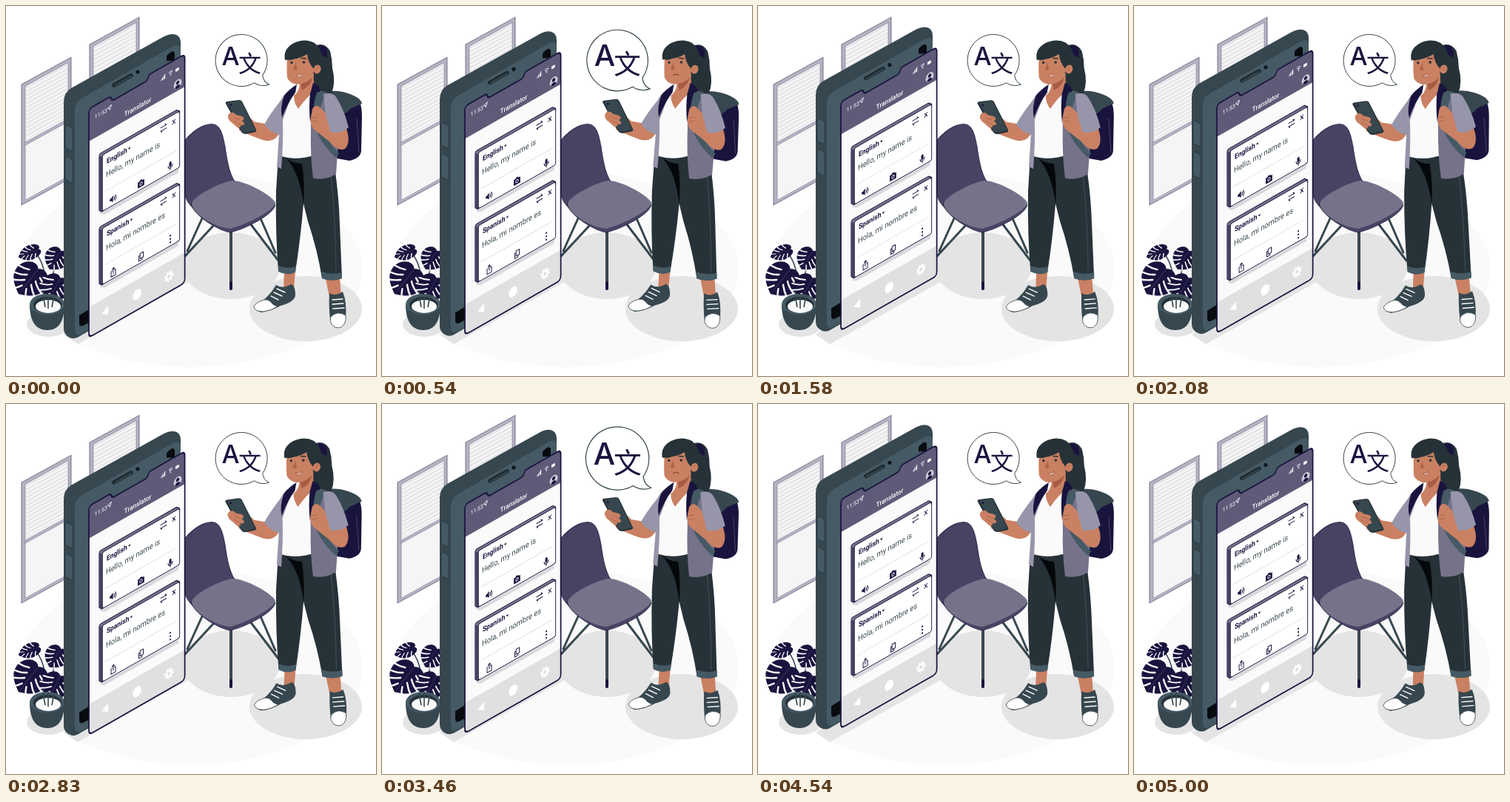
These frames come from a looping animation (500 px wide and 500 px high, 5.04 s). An HTML page:

```html
<!DOCTYPE html>
<html lang="en">
<head>
<meta charset="utf-8">
<title>Translator</title>
<style>
  html, body { margin: 0; height: 100%; overflow: hidden; background: #fff; }
  svg { display: block; width: 100vw; height: 100vh; font-family: Roboto, "Open Sans", sans-serif; }
  .navy { fill: #19143e; }
  .plum { fill: #474362; }
  .mauve { fill: #75728a; }
  .lilac { fill: #9795aa; }
  .skin { fill: #ca8062; }
  .ink { fill: #263238; }
  .slate { fill: #37474f; }
  .steel { fill: #455a64; }
  .paper { fill: #fafafa; }
  .shade { fill: #e4e4e4; }
  .white { fill: #fff; }
  .line { fill: none; stroke: #19143e; stroke-width: 1.1; stroke-linecap: round; stroke-linejoin: round; }
  .lace { fill: none; stroke: #fff; stroke-width: 1.4; stroke-linecap: round; }
  .leg { fill: none; stroke: #37474f; stroke-width: 3; stroke-linecap: round; }
  .fold { fill: none; stroke: #a85c43; stroke-width: .7; }
  .lang { font-size: 9.7px; font-weight: 700; fill: #19143e; }
  .say { font-size: 10.7px; fill: #37474f; }
</style>
</head>
<body>
<svg viewBox="0 0 500 500">
  <defs>
    <g id="window">
      <path d="M0 0H67V163H0Z" fill="#b5b2c2" stroke="#75728a"/>
      <path d="M5 5H63V159H5Z" fill="#f5f5f5" stroke="#8a87a0" stroke-width=".8"/>
      <path d="M34 7V78" stroke="#dcdce0" stroke-width="57" stroke-dasharray="1.4 4"/>
      <path d="M4 81H64V85H4Z" fill="#b5b2c2" stroke="#8a87a0" stroke-width=".6"/>
    </g>
    <g id="leaf">
      <path class="navy" d="M0-19C10-29 27-16 26 0C25 15 12 22 0 28C-12 22-25 15-26 0C-27-16-10-29 0-19Z"/>
      <path d="M-28-5Q-18-6-10-10M-28 7Q-16 5-8-2M-23 18Q-13 13-6 6M28-5Q18-6 10-10M28 7Q16 5 8-2M23 18Q13 13 6 6M-12 27Q-7 21-4 15M12 27Q7 21 4 15" fill="none" stroke="#fafafa" stroke-width="2.6" stroke-linecap="round"/>
      <path d="M0-18V24" stroke="#474362" stroke-width=".8"/>
    </g>
    <g id="card">
      <path d="M14 210L18 290L24 294H139V289H20Z" fill="#d8d8dd"/>
      <path d="M16 211Q16 208 19 208H136L141 212V216H22V288H20L16 284Z" class="mauve" stroke="#19143e"/>
      <path d="M16 211L21 214V288L16 284Z" class="plum"/>
      <rect x="21" y="212" width="120" height="76" rx="3" fill="#fff" stroke="#19143e"/>
      <path d="M25 263H137" stroke="#dcdce2" stroke-width=".9"/>
      <path class="line" d="M111.500 220H120.500L118.500 218M120.500 224.500H111.500L113.500 226.500M130 219.500L134 224.500M134 219.500L130 224.500"/>
    </g>
  </defs>

  <ellipse class="paper" cx="250" cy="356" rx="232" ry="132"/>
  <ellipse class="shade" cx="304" cy="351" rx="66" ry="45"/>
  <ellipse class="shade" cx="405" cy="409" rx="76" ry="44"/>
  <ellipse class="shade" cx="57" cy="430" rx="29" ry="17"/>
  <path class="shade" d="M78 444L97 457L275 357L250 340L112 420Z"/>
  <use href="#window" transform="matrix(1 -.55 0 1 21 106)"/>
  <use href="#window" transform="matrix(1 -.55 0 1 113 52)"/>

  <!-- chair -->
  <g>
    <path class="leg" d="M265 287L245 331M281 296L242 338M330 294L368 344M344 287L364 333"/>
    <path class="leg" d="M304 302V381" style="stroke-width:4"/>
    <path d="M304 374V382" stroke="#19143e" stroke-width="4" stroke-linecap="round"/>
    <path class="plum" d="M236 190C244 174 264 158 281 160C290 162 293 174 296 190C299 211 302 226 309 237L253 274Q243 265 240 252Z"/>
    <path class="plum" d="M250 267C252 282 287 304 303 306C320 303 363 282 364 268L357 270L303 298L259 275Z" stroke="#19143e" stroke-width=".6"/>
    <path class="mauve" d="M251 267C254 256 290 238 306 236C323 236 359 255 364 266C363 277 320 297 303 301C285 300 252 282 251 267Z"/>
    <path d="M246 178C257 164 272 158 281 160C290 162 293 174 296 190C299 211 302 226 309 237" fill="none" stroke="#19143e" stroke-width=".8"/>
  </g>

  <!-- plant -->
  <g>
    <path d="M57 405C54 391 47 383 41 377M55 404C57 374 51 346 41 335M59 404C63 386 68 383 72 376M58 403C62 372 63 358 68 348" fill="none" stroke="#37474f" stroke-width="1.6"/>
    <use href="#leaf" transform="translate(33 333) rotate(68) scale(.38 .62)"/>
    <use href="#leaf" transform="translate(68 341) rotate(32) scale(.62)"/>
    <use href="#leaf" transform="translate(33 369) rotate(38) scale(.92)"/>
    <use href="#leaf" transform="translate(67 380) rotate(28) scale(.74)"/>
    <path class="slate" d="M32 403C32 423 38 438 56 438C73 438 79 423 79 403Z"/>
    <ellipse class="steel" cx="55.500" cy="403" rx="23.500" ry="14"/>
    <ellipse class="ink" cx="56" cy="404" rx="19" ry="11"/>
    <ellipse class="paper" cx="57" cy="406" rx="17" ry="9"/>
    <path d="M53 407L50 391M57 409L57 390M62 407L65 391" stroke="#37474f" stroke-width="1.6"/>
  </g>

  <g id="phone">
    <path class="slate" d="M78 130Q78 117 88 111L212 42Q225 35 232 40Q236 43 236 50V366L100 446Q92 452 84 447Q78 443 78 436Z"/>
    <path class="steel" d="M93 142Q93 130 102 125L224 55Q236 48 236 60V366L104 442Q93 449 93 436Z"/>
    <path d="M99 418L112 410V428L104 432Q99 434 99 428ZM217 74V68Q218 65 225 61L228 63V74Z" fill="#080b10"/>
    <path class="steel" d="M80 165Q80 160 84 162L90 166V192Q90 197 86 195L80 191ZM80 207Q80 202 84 204L90 208V235Q90 240 86 238L80 234Z" stroke="#263238" stroke-width=".8"/>
    <path d="M146 107L169 94" stroke="#1d292f" stroke-width="5.500" stroke-linecap="round"/>
    <path d="M147 107.500L169 95" stroke="#37474f" stroke-width="2" stroke-linecap="round"/>
    <circle cx="178" cy="89" r="2.600" fill="#10171b"/>

    <g transform="matrix(.87 -.496 0 1 112 0)">
      <path id="panel" class="paper" d="M0 145Q0 139 6 139H30Q34 139 35 142.500T40 146H87Q91 146 92 142.500T97 139H143Q149 139 149 145V442Q149 448 143 448H6Q0 448 0 442Z"/>
      <path fill="#5e5a78" d="M0 183V145Q0 139 6 139H30Q34 139 35 142.500T40 146H87Q91 146 92 142.500T97 139H143Q149 139 149 145V183Z"/>
      <path fill="#e0e0e0" d="M0 407H149V442Q149 448 143 448H6Q0 448 0 442Z"/>
      <use href="#panel" style="fill-opacity:0" stroke="#19143e" stroke-width="2"/>

      <g fill="#fff">
        <text x="9" y="157.500" font-size="7.800">11:53</text>
        <text x="55" y="177" font-size="9.200" font-weight="500">Translator</text>
        <path d="M29 153L35 150.500L32.500 156.500L31.500 154Z" fill="none" stroke="#fff" stroke-width=".8"/>
        <path d="M112 157V155H113.200V157ZM113.800 157V153.500H115V157ZM115.600 157V152H116.800V157ZM117.400 157V150.500H118.600V157Z"/>
        <path d="M124 152.500Q127 150 130 152.500M125.200 154.500Q127 153 128.800 154.500" fill="none" stroke="#fff" stroke-width=".9"/>
        <circle cx="127" cy="156.200" r=".8"/>
        <rect x="134.500" y="152" width="5.500" height="4" rx="1"/>
        <circle cx="138" cy="174" r="6.300" fill="#c9c7d3"/>
        <circle class="navy" cx="138" cy="172" r="2.400"/>
        <path class="navy" d="M133.500 178Q138 172.500 142.500 178Q138 182 133.500 178Z"/>
      </g>

      <use href="#card"/>
      <text class="lang" x="27.500" y="227">English</text>
      <path class="navy" d="M61 222.500H65L63 225.200Z"/>
      <text class="say" x="26.500" y="245">Hello, my name is</text>
      <path class="navy" d="M32.500 277.300H34.500L37.500 274.500V283.500L34.500 280.700H32.500Z"/>
      <path class="line" d="M39 277Q40.500 279 39 281M40.800 275.300Q43.500 279 40.800 282.700"/>
      <path class="navy" d="M76 276.500H78.500L79.500 275H82.500L83.500 276.500H86V284.500H76Z"/>
      <circle cx="81" cy="280.300" r="1.900" fill="none" stroke="#fff"/>
      <rect class="navy" x="124.700" y="273" width="3.600" height="7" rx="1.800"/>
      <path class="line" d="M123 278Q123.500 281.500 126.500 281.500T130 278M126.500 282V284"/>

      <use href="#card" y="99"/>
      <text class="lang" x="27.500" y="325">Spanish</text>
      <path class="navy" d="M64 320.500H68L66 323.200Z"/>
      <text class="say" x="26.500" y="344">Hola, mi nombre es</text>
      <path class="line" d="M36 376.500H34.500V383.500H41.500V376.500H40M38 380V372.500M36 374.500L38 372.500L40 374.500"/>
      <path class="line" d="M79.500 374H84.500V381H79.500ZM79 376.500H77.500V383.500H82.500V381.500"/>
      <g class="navy"><circle cx="126.500" cy="373" r="1.200"/><circle cx="126.500" cy="377.500" r="1.200"/><circle cx="126.500" cy="382" r="1.200"/></g>

      <path class="white" d="M20 426L30 420V432Z"/>
      <circle class="white" cx="75" cy="427" r="6.800"/>
      <circle cx="124.500" cy="427" r="4" fill="none" stroke="#fff" stroke-width="3"/>
      <circle cx="124.500" cy="427" r="6.300" fill="none" stroke="#fff" stroke-width="2" stroke-dasharray="2.470"/>
    </g>
  </g>

  <g id="bubble">
    <path d="M335.500 103.800A35 35 0 1 1 346.700 93.600Q348 103 355.500 106Q345 110 335.500 103.800Z" fill="#fff" stroke="#37474f"/>
    <text class="navy" x="291.500" y="80" font-size="34" font-weight="500" font-family="Inter, sans-serif">A</text>
    <text class="navy" x="314" y="89" font-size="31" font-weight="500" font-family="'Noto Sans CJK SC', 'Noto Sans CJK JP', 'Noto Sans CJK', sans-serif">文</text>
  </g>

  <g id="person">
    <!-- backpack -->
    <path class="navy" d="M440 128L474 124Q481 130 481 150L480 196Q479 206 464 209L441 205Z"/>
    <path class="slate" d="M430 117Q444 112 462 118Q480 124 481 132L465 139Q460 146 448 150Z"/>
    <path d="M474 152L477 198" stroke="#474362" stroke-width="1"/>

    <!-- ankles and shoes -->
    <path class="skin" d="M376 358H391L389 382L375 383ZM431 364L451 366L453 392L437 393Z"/>
    <path class="slate" d="M365 377Q374 383 385 376Q391 377 391 391Q390 400 371 405Q357 413 344 414Q336 411 336 405Q354 396 365 377Z"/>
    <path class="white" d="M349 397Q338 400 335 406Q336 413 347 413Q358 412 367 406Q360 404 358 400Q354 396 349 397Z" stroke="#37474f" stroke-width=".8"/>
    <path class="lace" d="M358 392L368 397M362 387L373 392M366 382L377 387"/>
    <path class="slate" d="M437 388Q445 393 455 386Q461 400 459 423Q456 433 449 435Q440 434 438 424Q436 405 437 388Z"/>
    <path class="white" d="M439 420Q448 411 459 418Q460 430 453 434Q445 437 440 430Q437 426 439 420Z" stroke="#37474f" stroke-width=".8"/>
    <path class="lace" d="M441 397L455 396M441 403L456 402M442 409L457 408"/>

    <!-- trousers -->
    <path class="ink" d="M368 202L414 203L445 224Q450 260 451 295L454 368Q440 373 427 368Q421 330 408 291L402 267Q398 315 391 359Q380 364 368 358Q364 310 365 250Z"/>
    <path class="steel" d="M368 351Q380 356 392 352L391 360Q380 365 368 359ZM426 359Q440 364 454 360V368Q440 373 427 368Z"/>
    <path d="M378 205Q388 213 400 213Q404 240 402 268Q397 225 378 205Z" fill="#05080a"/>
    <path d="M439 228Q445 280 446 358" fill="none" stroke="#455a64" stroke-width=".8"/>

    <!-- ponytail, torso and backpack strap -->
    <path class="ink" d="M414 55Q430 47 438 61Q441 72 441 84Q446 103 440 118Q426 118 414 110Z"/>
    <path class="navy" d="M420 55Q430 50 434 60L434 70Q427 66 420 64Z"/>
    <path class="paper" d="M382 119L411 112L420 200Q395 210 372 203L374 160Z"/>
    <path class="skin" d="M397 98L416 91Q415 107 419 115Q409 119 395 139Q389 131 389 121Q398 115 397 98Z"/>
    <path d="M398 104Q408 104 414 96Q412 108 400 114Z" fill="#a85c43"/>
    <path class="skin" d="M370 142L370 170Q364 186 347 181Q332 176 315 168L315 153Q332 156 350 159Z"/>
    <path class="lilac" d="M391 110Q377 115 371 128Q356 147 349 160Q357 171 369 174L366 217L372 220Q375 185 374 154L386 121Z"/>
    <path class="navy" d="M393 106Q382 113 376 121Q370 137 373 151Q381 130 391 117Z"/>
    <path class="mauve" d="M411 116Q425 112 436 119L450 172L446 227Q433 236 415 233Q411 202 412 165Z"/>
    <path class="navy" d="M415 104Q423 107 425 114L413 145L411 157Q409 135 411 119Z"/>
    <path class="steel" d="M420 117Q431 113 434 118Q425 129 424 146Q426 175 450 199L446 205Q419 181 415 151Q415 130 420 117Z"/>
    <path class="skin" d="M414 139Q418 133 423 136L432 145Q434 155 440 162L459 163Q467 184 458 193Q448 197 438 184L419 169Q410 163 412 151Z"/>
    <path class="fold" d="M413 151L421 150M413 156L422 155"/>
    <path class="lilac" d="M429 119Q441 116 446 123Q457 140 463 164Q451 174 438 170Q435 157 432 148Z"/>

    <!-- handset -->
    <path class="skin" d="M304 149Q300 143 307 142L322 146Q331 151 337 158L334 171Q319 171 309 161Z"/>
    <path class="ink" d="M297 132Q296 129.500 299 129L315 127Q318 127 319 129L338 167Q339 170 336 170.500L324 173Q320 173 318 170Z"/>
    <path class="slate" d="M299 130.500L315 128Q317 128 318 130L337 168L323 171Q320 171 318 168Z"/>
    <circle class="navy" cx="304" cy="133.500" r="1.500"/>
    <path class="skin" d="M301 146Q306 141 311 147L319 149Q324 152 319 155L322 158Q323 162 317 161Q318 166 312 163L303 156Q298 150 301 146Z"/>
    <path class="fold" d="M309 151L317 154M308 156L317 160"/>

    <!-- head -->
    <path class="skin" d="M380 68Q379 84 380 97Q383 104 393 106Q405 106 414 96L418 80L408 58Z"/>
    <path class="ink" d="M377 73Q374 58 389 50Q404 43 417 50Q427 58 428 73Q428 86 421 96Q419 90 415 84Q408 76 407 65Q397 72 377 73Z"/>
    <ellipse class="skin" cx="420.500" cy="85.500" rx="5" ry="6" transform="rotate(20 420.500 85.500)"/>
    <path class="fold" d="M418 87Q419 83 423 83"/>
    <path d="M392 77L388 85Q390 88 393.500 86.500Z" fill="#b0634a"/>
    <circle class="ink" cx="386" cy="76.500" r="1.700"/>
    <circle class="ink" cx="402.500" cy="76" r="1.800"/>
    <path d="M382 72.500L387.500 71.500M399 70.500L405.500 71" stroke="#263238" stroke-width="1.400" stroke-linecap="round"/>
    <path id="smile" d="M392 94Q397 94.500 400.500 91Q399.500 96 394 95.500Z" fill="#fff" stroke="#9c4a38" stroke-width=".8"/>
    <path id="frown" d="M392 94Q396 91.500 399.500 93.500" fill="none" stroke="#8c4332" stroke-width="1.200" stroke-linecap="round"/>
  </g>
</svg>
<script>
  const LOOP = 5040, CYCLE = 3000;
  const el = id => document.getElementById(id);
  const move = (id, value) => el(id).setAttribute('transform', value);

  // Linear interpolation through [time, value] pairs.
  function track(t, keys) {
    const i = Math.max(1, keys.findIndex(k => k[0] >= t));
    const [t0, v0] = keys[i - 1], [t1, v1] = keys[i];
    return v0 + (v1 - v0) * (t - t0) / (t1 - t0);
  }

  function draw() {
    const t = performance.now() % LOOP % CYCLE;
    const lift = track(t, [[0, 0], [1500, -10], [CYCLE, 0]]);
    const sway = track(t, [[0, 0], [750, 1], [2250, -1], [CYCLE, 0]]);
    const pulse = track(t, [[0, 1], [300, 1.3], [900, 1], [CYCLE, 1]]);
    const sad = t >= 300 && t < 1500;

    move('phone', `translate(0 ${lift})`);
    move('person', `rotate(${sway} 408 240)`);
    move('bubble', `translate(318 73) scale(${pulse}) translate(-318 -73)`);
    el('smile').style.display = sad ? 'none' : '';
    el('frown').style.display = sad ? '' : 'none';
    requestAnimationFrame(draw);
  }
  draw();
</script>
</body>
</html>
```
